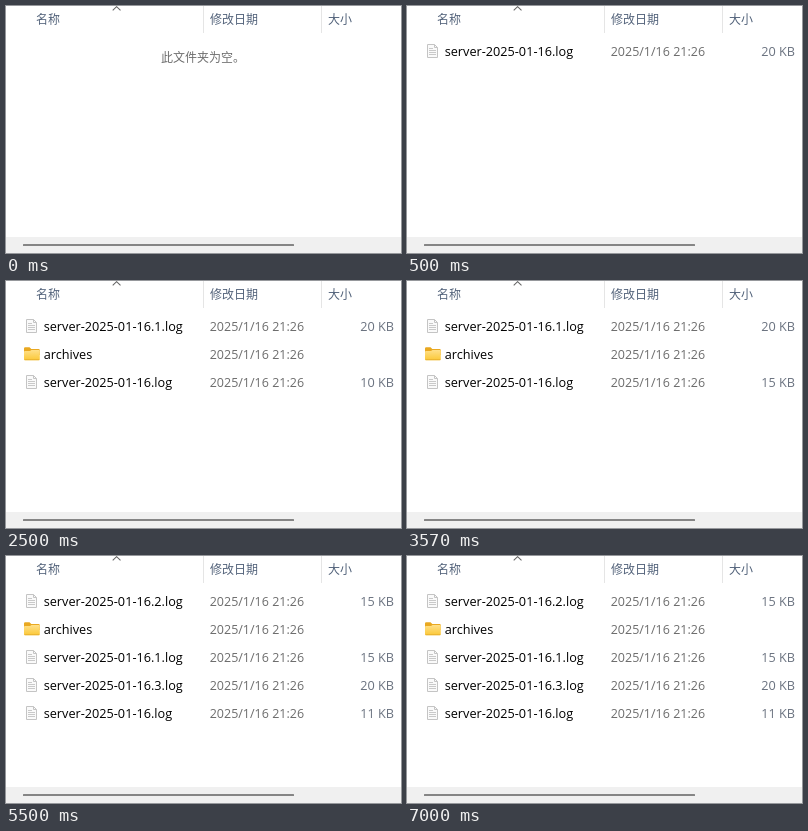
These frames come from a looping animation (395x247 px, 8000 ms). An HTML page:

```html
<!DOCTYPE html>
<html lang="zh-CN">
<head>
<meta charset="utf-8">
<title>日志文件夹</title>
<style>
html, body { margin: 0; width: 100%; height: 100%; overflow: hidden; background: #fff; }
svg { display: block; }
text { font-family: "Open Sans", "Noto Sans", sans-serif; font-size: 12.5px; fill: #6d6d6d; white-space: pre; }
.cjk { font-family: "Noto Sans CJK SC", "Noto Sans CJK", sans-serif; font-size: 12px; }
.head { fill: #52627a; }
.name { font-size: 12.7px; fill: #000; }
.size { font-size: 12.7px; fill: #6b7380; text-anchor: end; }
.scene { visibility: hidden; }
</style>
</head>
<body>
<svg id="stage" width="395" height="247" viewBox="0 0 395 247">
  <defs>
    <linearGradient id="gold" x1="0" y1="0" x2="0" y2="1">
      <stop offset="0" stop-color="#ffe08a"/>
      <stop offset="1" stop-color="#fbc837"/>
    </linearGradient>
    <g id="file">
      <path d="M20.5 38.5H27.5L30.5 41.5V51.5H20.5Z" fill="#fafafa" stroke="#c4c4c4"/>
      <path d="M27.5 38.5V41.5H30.5" fill="none" stroke="#c4c4c4"/>
      <path d="M22 42.5H26M22 44.5H29M22 46.5H29M22 48.5H29" stroke="#c4c4c4" stroke-width=".9"/>
    </g>
    <g id="folder">
      <path d="M18 39.5a1.2 1.2 0 0 1 1.2-1.2H23.5L25.3 40H32.6a1.2 1.2 0 0 1 1.2 1.2V46H18Z" fill="#e9a820"/>
      <path d="M18 43a1 1 0 0 1 1-1H24L25.5 41H32.8a1 1 0 0 1 1 1V50a1.2 1.2 0 0 1-1.2 1.2H19.2A1.2 1.2 0 0 1 18 50Z" fill="url(#gold)"/>
      <path d="M18.4 50.7H33.4" stroke="#e5ad2c" stroke-width=".8"/>
    </g>
  </defs>
  <rect width="395" height="247" fill="#fff"/>
  <path d="M197.5 0V27M315.5 0V27" stroke="#e5e5e5"/>
  <path d="M106.7 4.4L110.6 .7L114.5 4.4" fill="none" stroke="#666" stroke-width="1.1"/>
  <text class="cjk head" x="30" y="18">名称</text>
  <text class="cjk head" x="204" y="18">修改日期</text>
  <text class="cjk head" x="322" y="18">大小</text>
  <rect y="231" width="395" height="16" fill="#f0f0f0"/>
  <rect x="17" y="238" width="271" height="2" rx=".6" fill="#858585"/>
</svg>
<script>
const LOOP = 8000, ROW = 28;
const stage = document.getElementById('stage');
const log = (part, kb) => ({ name: `server-2025-01-16${part}.log`, size: `${kb} KB`, icon: 'file' });
const folder = { name: 'archives', size: '', icon: 'folder' };

const scenes = [
  { at: 0, rows: [] },
  { at: 500, rows: [log('', 20)] },
  { at: 2500, rows: [log('.1', 20), folder, log('', 10)] },
  { at: 3570, rows: [log('.1', 20), folder, log('', 15)] },
  { at: 5500, rows: [log('.2', 15), folder, log('.1', 15), log('.3', 20), log('', 11)] }
];

function add(parent, tag, attrs, content = '') {
  const el = document.createElementNS('http://www.w3.org/2000/svg', tag);
  for (const key in attrs) el.setAttribute(key, attrs[key]);
  el.textContent = content;
  return parent.appendChild(el);
}

function drawRow(parent, row, i) {
  const g = add(parent, 'g', { transform: `translate(0 ${i * ROW})` });
  add(g, 'use', { href: '#' + row.icon });
  add(g, 'text', { class: 'name', x: 37.7, y: 50 }, row.name);
  add(g, 'text', { x: 203.7, y: 50 }, '2025/1/16 21:26');
  add(g, 'text', { class: 'size', x: 388, y: 50 }, row.size);
}

scenes.forEach((scene, i) => {
  const g = add(stage, 'g', { class: 'scene' });
  scene.rows.forEach((row, n) => drawRow(g, row, n));
  if (!scene.rows.length) add(g, 'text', { class: 'cjk', x: 155, y: 55.5 }, '此文件夹为空。');

  const end = i + 1 < scenes.length ? scenes[i + 1].at : LOOP;
  const step = (time, visibility) => ({ offset: time / LOOP, visibility, easing: 'step-end' });
  const frames = [step(scene.at, 'visible'), step(end, 'hidden')];
  if (scene.at > 0) frames.unshift(step(0, 'hidden'));
  if (end < LOOP) frames.push(step(LOOP, 'hidden'));
  g.animate(frames, { duration: LOOP, iterations: Infinity }).startTime = 0;
});
</script>
</body>
</html>
```
